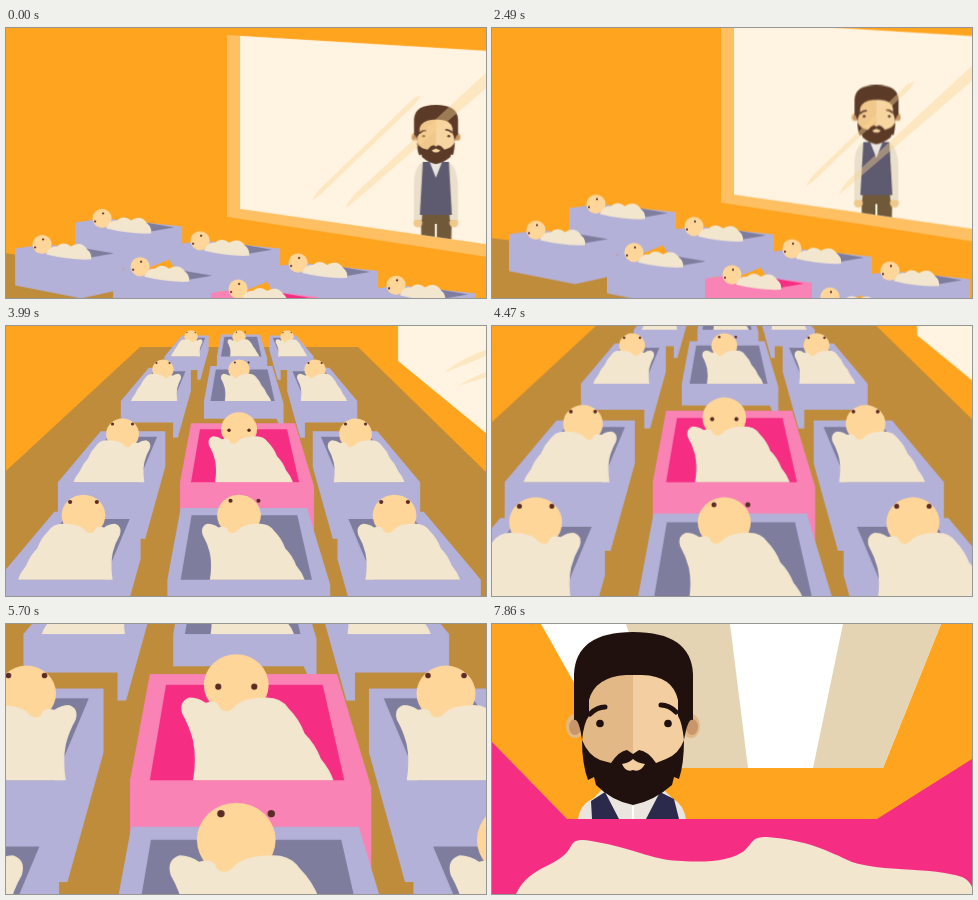
Write an HTML page that moves like this. It is 480x270 px and loops after 8 s.

```html
<!DOCTYPE html>
<html lang="en">
<head>
<meta charset="utf-8">
<title>Nursery</title>
<style>
  html, body { margin: 0; width: 100%; height: 100%; overflow: hidden; background: #ffa41f; }
  svg { display: block; width: 100vw; height: 100vh; }

  .orange { fill: #ffa41f; }
  .floor { fill: #bf8c3c; }
  .glass { fill: #fff4e1; }
  .frame { fill: #ffc063; }
  .shine { fill: #fbd493; opacity: .42; }
  .crib { fill: #b4b1d8; }
  .hollow { fill: #7e7d9e; }
  .pink { --crib: #f983b5; --hollow: #f52e84; }
  .crib { fill: var(--crib, #b4b1d8); }
  .hollow { fill: var(--hollow, #7e7d9e); }
  .hot { fill: #f52e84; }
  .cloth { fill: #f2e6ce; }
  .baby { fill: #ffd699; }
  .dot { fill: #5b2b26; }
  .beige { fill: #e4d4b4; }
  .white { fill: #fff; }

  .hair { fill: var(--hair); }
  .brow { fill: none; stroke: var(--hair); stroke-width: 5; stroke-linecap: round; }
  .shade { fill: var(--shade); }
  .skin { fill: var(--skin); }
  .ear { fill: #c9966b; }
  .dark { --hair: #21110e; --shade: #e2b986; --skin: #f3cea0; }
  .soft { --hair: #5b3b28; --shade: #f0c88c; --skin: #f7d6a2; }
  .sleeve { fill: #e9dfcb; }
  .vest { fill: #5e5a6f; }
  .trousers { fill: #6f5938; }
  .shirt { fill: #eae6df; }
  .navy { fill: #2c2a4c; }

  .scene { animation: 8s step-end infinite; }
  #ward { animation-name: ward; }
  #rows { animation-name: rows; }
  #bedside { animation-name: bedside; }
  @keyframes ward { 0% { visibility: visible; } 34.875%, 100% { visibility: hidden; } }
  @keyframes rows { 0% { visibility: hidden; } 34.875% { visibility: visible; } 78%, 100% { visibility: hidden; } }
  @keyframes bedside { 0% { visibility: hidden; } 78%, 100% { visibility: visible; } }

  .pan { animation: pan 8s infinite; }
  @keyframes pan {
    0% { transform: translate(0, 0); animation-timing-function: cubic-bezier(.333, .478, .667, .811); }
    34.5%, 100% { transform: translate(8.5px, -15.3px); }
  }
  .walk { animation: walk 8s linear infinite; }
  @keyframes walk {
    0% { transform: translate(0, 0); }
    12.75% { transform: translate(-19px, 0); }
    34.5%, 100% { transform: translate(-60px, -6.6px); }
  }
  .zoom { transform-origin: 236.5px 156px; animation: zoom 8s infinite; }
  @keyframes zoom {
    0%, 43.5% { transform: scale(.845); animation-timing-function: cubic-bezier(.333, .167, .667, .833); }
    77.625%, 100% { transform: scale(1.955); }
  }
  .rise { animation: rise 8s infinite; }
  @keyframes rise {
    0%, 82.125% { transform: translate(160px, 92px) scale(.82); animation-timing-function: cubic-bezier(.3, .25, .6, .95); }
    98.25%, 100% { transform: translate(141px, 8px) scale(1); }
  }
</style>
</head>
<body>
<svg viewBox="0 0 480 270">
  <defs>
    <clipPath id="pane"><path d="M234 8L520 25.5V222L234 181Z"/></clipPath>

    <!-- bearded head, origin at the top centre of the hair -->
    <g id="head"><g transform="translate(-141 -8)">
      <ellipse class="shade" cx="83" cy="102" rx="9" ry="12"/>
      <ellipse class="shade" cx="199" cy="102" rx="9" ry="12"/>
      <ellipse class="ear" cx="83" cy="103" rx="6" ry="8"/>
      <ellipse class="ear" cx="200" cy="103" rx="6" ry="8"/>
      <path class="shade" d="M91 48H190V130Q180 172 141 175Q102 172 91 130Z"/>
      <path class="skin" d="M141 45H191V130Q180 172 141 175Z"/>
      <path class="hair" d="M82 96V50Q84 8 141 8Q199 8 201 50V96Q196 93 192 116Q190 98 186 92V76Q181 52 150 51H134Q103 53 97 76V92Q92 98 90 116Q87 94 82 96Z"/>
      <path class="hair" d="M90 116Q96 131 108 136L119 139Q127 127 135 126L141 130L147 126Q156 127 164 139L174 135Q187 130 192 116Q192 140 187 155L182 153L180 161Q162 177 141 181Q120 177 104 161L102 153L96 156Q90 140 90 116Z"/>
      <path class="skin" d="M130 140Q137 139 141 135Q145 139 153 140Q148 149 141 146Q134 149 130 140Z"/>
      <path class="brow" d="M98 90Q105 83 113 83M169 81Q177 81 184 88"/>
      <circle class="hair" cx="108" cy="99.5" r="3.8"/>
      <circle class="hair" cx="176" cy="99.5" r="3.8"/>
    </g></g>

    <!-- crib content seen from the side -->
    <g id="sleeper">
      <circle class="baby" cx="27" cy="-4" r="9.6"/>
      <circle class="dot" cx="20" cy="-1" r="1.1"/>
      <circle class="dot" cx="28" cy="-9" r="1.1"/>
      <path class="cloth" d="M31 6Q34 -3 42 -2Q48 -8 56 -2Q66 -8 72 1Q77 5 76 11Q55 12 31 6Z"/>
    </g>

    <!-- cribs seen from the foot end, origin on the front rim below the head -->
    <g id="outerCrib">
      <path class="crib" d="M24 -56H-47V-17L-25 62H-17V36H71V0Z"/>
      <path class="hollow" d="M16 -50H-38L-17 0H54Z"/>
    </g>
    <g id="middleCrib">
      <path class="crib" d="M-48 -59H56L75 4V57L63 30H-59V0Z"/>
      <path class="hollow" d="M-39 -53H48L60 0H-48Z"/>
    </g>
    <g id="baby">
      <ellipse class="baby" cy="-53" rx="18" ry="17"/>
      <path class="cloth" d="M-24 0Q-22 -12 -24 -22Q-26 -30 -30 -37Q-32 -44 -26 -46Q-21 -46 -17 -43Q-10 -45 -9 -40Q-5 -36 0 -42Q5 -46 17 -46Q25 -46 29 -40Q35 -34 38 -26Q44 -20 47 -12Q52 -6 54 0Z"/>
    </g>
  </defs>

  <g id="ward" class="scene">
    <rect class="orange" width="480" height="270"/>
    <g class="pan">
      <path class="frame" d="M221 7L234 8L520 25V235L221 189Z"/>
      <path class="glass" d="M234 8L520 25.5V222L234 181Z"/>
      <g clip-path="url(#pane)">
        <g class="walk soft">
          <path class="trousers" d="M415 186H446L445 235H431V196H429V235H416Z"/>
          <circle class="shade" cx="412" cy="195" r="4.5"/>
          <circle class="shade" cx="448" cy="195" r="4.5"/>
          <path class="sleeve" d="M418 134Q409 137 408 155V192H416L419 150ZM442 134Q450 137 452 155V192H444L441 150Z"/>
          <path class="vest" d="M417 134H443L446 187H414Z"/>
          <path class="shirt" d="M423 132H437L430 150Z"/>
          <use href="#head" transform="translate(430 77) scale(.37 .342)"/>
        </g>
        <path class="shine" d="M306 173Q310 164 318 157L408 70L414 68Q411 75 405 80L315 166Z"/>
        <path class="shine" d="M339 181Q343 171 352 163L470 54L520 8V22L478 62L350 172Z"/>
      </g>
      <path class="floor" d="M-20 223L200 250V330H-20Z"/>
      <g id="sideCribs"></g>
    </g>
  </g>

  <g id="rows" class="scene">
    <rect class="orange" width="480" height="270"/>
    <g class="zoom">
      <path class="floor" d="M134 21H352L732 392H-267Z"/>
      <path class="glass" d="M392 -80V35L620 222V-80Z"/>
      <path class="shine" d="M438 47Q455 32 490 20V26Q460 38 438 47ZM452 60Q470 48 500 40V46Q470 54 452 60Z"/>
      <g id="topCribs"></g>
    </g>
  </g>

  <g id="bedside" class="scene">
    <rect class="orange" width="480" height="270"/>
    <path class="white" d="M49 0H449L391 144H130Z"/>
    <path class="beige" d="M134 0H238L256 144H182ZM351 0H449L391 144H321Z"/>
    <g class="rise dark">
      <g transform="translate(-141 -8)">
        <path class="shirt" d="M86 195Q88 180 102 174L113 162H168L180 174Q192 181 194 195V290H86Z"/>
        <path class="navy" d="M99 177L113 168L127 195V290H100V195ZM182 175L168 168L154 195V290H187V195Z"/>
        <path class="white" d="M140 182H142V290H140Z"/>
      </g>
      <use href="#head"/>
    </g>
    <path class="hot" d="M0 118L75 195H385L480 135V270H0Z"/>
    <path class="cloth" d="M24 270C38 240 68 244 79 222C83 213 95 216 110 219C145 226 165 237 190 237C218 239 240 236 252 227C262 218 259 213 275 213C315 216 336 227 360 238C390 248 440 243 470 253Q477 256 480 263V270Z"/>
  </g>
</svg>

<script>
  const dot = (x, y) => `<circle class="dot" cx="${x}" cy="${y}" r="1.7"/>`;

  // Two slanting rows of four, the far one first.
  function sideCrib(row, i) {
    const x = (row ? 9 : 69) + 98 * i;
    const y = (row ? 220.5 : 194.5) + 22.3 * i;
    const gap = row && (i === 1 || i === 2);
    return `<g class="${row && i === 2 ? 'pink' : ''}" transform="translate(${x} ${y})">
      <path class="crib" d="M0 0L30 -4L107 4V41L66 50L0 37Z"/>
      <path class="hollow" d="M64 -1L99 5L76 9Z"/>
      ${gap ? '<path class="orange" d="M36 -3L56 -11L62 -1L44 3Z"/>' : ''}
      <use href="#sleeper"/></g>`;
  }

  // Three columns (-1, 0, 1) in perspective: position follows from the row's scale.
  const rowScales = [.375, .594, .91, 1.215];
  function topCrib(row, column) {
    const s = rowScales[row];
    const pink = row === 2 && !column;
    const x = 233 + column * 128 * s;
    const front = 105 * s + 101 * s * s - 23;
    const mirror = column < 0 ? 'scale(-1 1)' : '';
    const eyes = pink ? dot(-10, -52) + dot(10, -52)
      : column ? dot(-11, -64) + dot(11, -64)
      : dot(-7, -65) + dot(16, -65);
    return `<g class="${pink ? 'pink' : ''}" transform="translate(${x} ${front}) scale(${pink ? 1 : s})">
      <g transform="${mirror}"><use href="#${column ? 'outerCrib' : 'middleCrib'}"/><use href="#baby"/></g>
      ${eyes}</g>`;
  }

  let side = '', top3 = '';
  for (let row = 0; row < 2; row++)
    for (let i = 0; i < 4; i++) side += sideCrib(row, i);
  for (let row = 0; row < rowScales.length; row++)
    for (let column = -1; column <= 1; column++) top3 += topCrib(row, column);
  document.getElementById('sideCribs').innerHTML = side;
  document.getElementById('topCribs').innerHTML = top3;
</script>
</body>
</html>
```
